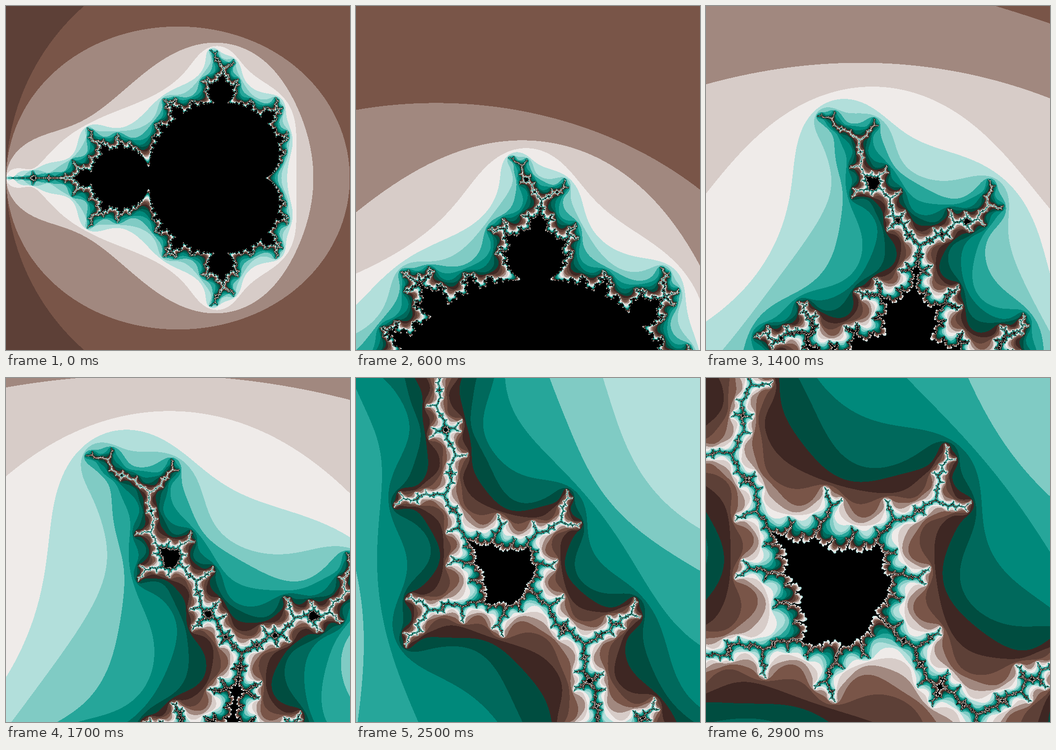
These frames come from a looping animation (700x700 px, 3 s). An HTML page with a canvas:

```html
<!DOCTYPE html>
<html lang="en">
<head>
<meta charset="utf-8">
<title>Mandelbrot zoom</title>
<style>
  html, body { margin: 0; width: 100%; height: 100%; overflow: hidden; background: #000; }
  canvas { display: block; width: 700px; height: 700px; }
</style>
</head>
<body>
<canvas id="view" width="700" height="700"></canvas>
<script>
const SIZE = 700, STEPS = 30, STEP_MS = 100;
const MAX_ITER = 31, ZOOM = 1.15, SPAN = 3;
const HOME = { re: -0.5, im: 0 };
const TARGET = { re: -0.1528, im: 1.0397 };

const PALETTE = [
  '3e2723', '5d4037', '795548', 'a1887f', 'd7ccc8', 'efebe9',
  'b2dfdb', '80cbc4', '26a69a', '00897b', '00695c', '004d40'
];

const ctx = document.getElementById('view').getContext('2d');
const image = ctx.createImageData(SIZE, SIZE);
const pixels = new Uint32Array(image.data.buffer);

// Packed little-endian ABGR
const pack = hex => {
  const v = parseInt(hex, 16);
  return (0xff000000 | (v & 255) << 16 | (v & 0xff00) | v >> 16) >>> 0;
};
const colors = new Uint32Array(MAX_ITER + 1);
for (let n = 0; n < MAX_ITER; n++) colors[n] = pack(PALETTE[n % PALETTE.length]);
colors[MAX_ITER] = pack('000000');

function escapeCount(cr, ci) {
  let x = 0, y = 0, x2 = 0, y2 = 0, n = 0;
  while (n < MAX_ITER && x2 + y2 <= 4) {
    y = 2 * x * y + ci;
    x = x2 - y2 + cr;
    x2 = x * x;
    y2 = y * y;
    n++;
  }
  return n;
}

// The first and last pixels sample the exact edges of the view.
function draw(step) {
  const center = step === 0 ? HOME : TARGET;
  const last = SIZE - 1, half = last / 2;
  const unit = SPAN / Math.pow(ZOOM, step) / last;
  let p = 0;
  for (let row = 0; row < SIZE; row++) {
    const ci = center.im + (half - row) * unit;
    for (let col = 0; col < SIZE; col++) {
      pixels[p++] = colors[escapeCount(center.re + (col - half) * unit, ci)];
    }
  }
  ctx.putImageData(image, 0, 0);
}

const start = performance.now();
let shown = 0;
draw(0);

function tick() {
  const elapsed = Math.max(0, performance.now() - start);
  const step = Math.floor(elapsed / STEP_MS) % STEPS;
  if (step !== shown) {
    draw(step);
    shown = step;
  }
  requestAnimationFrame(tick);
}
requestAnimationFrame(tick);
</script>
</body>
</html>
```
